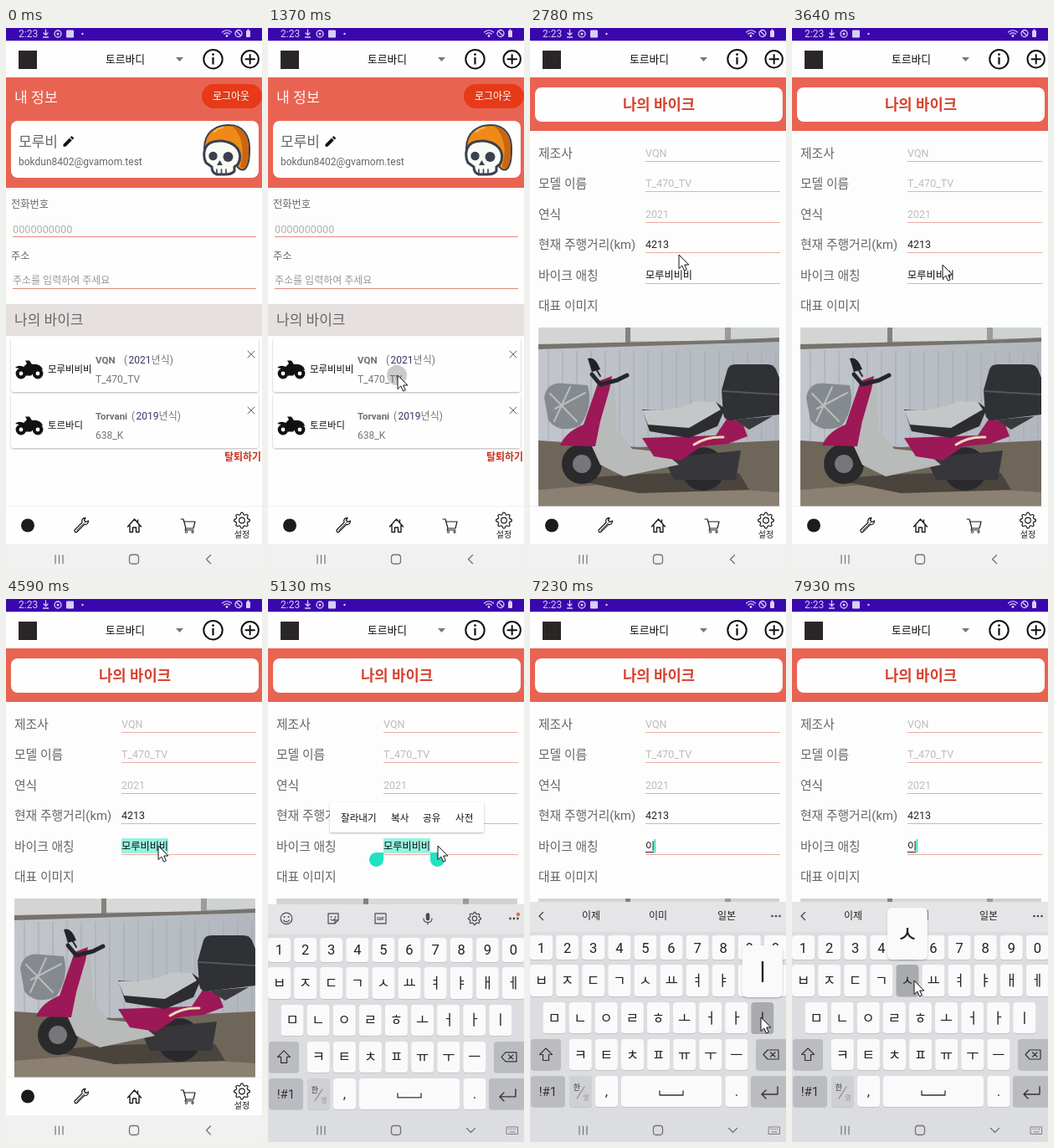
An HTML page that plays this animation: 306x649 px, repeating every 8 s.

```html
<!DOCTYPE html>
<html lang="ko">
<head>
<meta charset="utf-8">
<title>나의 바이크</title>
<style>
html, body { margin: 0; width: 100%; height: 100%; overflow: hidden; background: #fdfdfd; }
svg { display: block; width: 100%; height: 100%; }
text { font-family: Roboto, "Noto Sans CJK KR", "Noto Sans CJK JP", "Noto Sans CJK", sans-serif; white-space: pre; }
</style>
</head>
<body>
<svg id="stage" viewBox="0 0 306 649" lang="ko"></svg>
<script>
const LOOP = 8000;
const RED = '#e96353', TEAL = '#1fe3c0', GREY = '#666';

// Drawing helpers
const rect = (x, y, w, h, fill, r = 0, more = '') =>
  `<rect x="${x}" y="${y}" width="${w}" height="${h}" rx="${r}" fill="${fill}" ${more}/>`;
const disc = (x, y, r, fill, more = '') => `<circle cx="${x}" cy="${y}" r="${r}" fill="${fill}" ${more}/>`;
const ring = (x, y, r, stroke, w = 1) => disc(x, y, r, 'none', `stroke="${stroke}" stroke-width="${w}"`);
const line = (d, stroke, w = 1) =>
  `<path d="${d}" fill="none" stroke="${stroke}" stroke-width="${w}" stroke-linecap="round" stroke-linejoin="round"/>`;
const fillPath = (d, fill, more = '') => `<path d="${d}" fill="${fill}" ${more}/>`;
const text = (x, y, size, str, fill = '#111', more = '') =>
  `<text x="${x}" y="${y}" font-size="${size}" fill="${fill}" ${more}>${str}</text>`;
const mid = (x, y, size, str, fill, more = '') => text(x, y, size, str, fill, `text-anchor="middle" ${more}`);
const group = (id, body) => `<g id="${id}">${body}</g>`;
const at = (x, y, body) => `<g transform="translate(${x} ${y})">${body}</g>`;
const shadowed = body => `<g filter="url(#shadow)">${body}</g>`;
const rule = (x, y, color) => rect(x, y, 299 - x, 1, color);

function gear(x, y, r, stroke, w = 1.2) {
  const pts = [];
  for (let i = 0; i < 32; i++) {
    const a = (i - 1.5) * Math.PI / 16, d = i % 4 === 1 || i % 4 === 2 ? r : r * 0.77;
    pts.push((x + d * Math.sin(a)).toFixed(1) + ' ' + (y - d * Math.cos(a)).toFixed(1));
  }
  return line('M' + pts.join('L') + 'Z', stroke, w) + ring(x, y, r * 0.36, stroke, w);
}

function statusBar() {
  const c = '#d9cff3';
  return rect(0, 0, 306, 15.5, '#3a06ad') + text(15, 11, 12, '2:23', c) +
    line('M47.5 2V8M45 6L47.5 8.5L50 6M44.5 11H50.5', c, 1.3) +
    ring(62, 7, 4, c, 1.3) + disc(62, 7, 1.5, c) + rect(72, 2.5, 9, 9, c, 1) + disc(91.5, 7, 1.2, c) +
    line('M258.5 5Q264 0.5 269.5 5M260.5 7.2Q264 4.5 267.5 7.2', c, 1.2) + disc(264, 9.5, 1.4, c) +
    ring(278, 6.5, 4, c, 1.3) + line('M275.5 4L280.5 9', c, 1.3) +
    rect(287, 3, 5, 8, c, 1) + rect(288.5, 1.5, 2, 2, c);
}

function appBar() {
  return rect(0, 15.5, 306, 44, '#fefefe') + rect(15, 27, 22, 22, '#2b2626') +
    text(119, 42, 12.8, '토르바디') + fillPath('M203 35H212L207.5 40Z', '#777') +
    ring(247.5, 37.2, 11.2, '#111', 2) + rect(246.4, 35, 2.2, 8.5, '#111') + disc(247.5, 31.6, 1.4, '#111') +
    ring(291.7, 37.2, 10.2, '#111', 2) + line('M286.5 37.2H297M291.7 32V42.4', '#111', 2);
}

function tabBar() {
  const k = '#1c1c1c';
  return rect(0, 572, 306, 46, '#fefefe') + rect(0, 571.5, 306, 0.8, '#ececec') + disc(26, 594.5, 8, k) +
    line('M82 600L91 591Q89.5 586 95 585.5L93.5 588.5L95.5 590.5L98.5 589Q98.5 594 93.5 593.5L84.5 602.5Q82 603.5 82 600Z', k, 1.3) +
    line('M84.5 600.5L94 591', k, 0.8) +
    line('M145.5 596L153.5 587L161.5 596M148 594.5V602.5H151.5V597H155.5V602.5H159V594.5M157.5 588V591', k, 1.4) +
    line('M209 587H212L215 598H224L226 590H213M215 598L214 600H224', k, 1.2) +
    ring(215.5, 602.3, 1.2, k) + ring(223, 602.3, 1.2, k) +
    gear(282, 588.5, 9.3, k) + mid(282, 609, 10, '설정', k);
}

function systemBar(bg, typing) {
  const c = '#747474', boxes = [0, 1, 2, 3].map(i => disc(288 + i * 2.5, 633.5, 0.7, c)).join('');
  return rect(0, 617, 306, 32, bg) + line('M59 630V640M63.5 630V640M68 630V640', c, 1.2) +
    `<rect x="147.5" y="629.5" width="11" height="11" rx="3.2" fill="none" stroke="${c}" stroke-width="1.3"/>` +
    (typing
      ? line('M237.5 632.5L242.5 637.5L247.5 632.5', c, 1.3) + boxes +
        line('M285.5 631H298.5V639.5H285.5ZM289 637H295', c, 0.9)
      : line('M244.5 630L239.5 635L244.5 640', c, 1.3));
}

function skull() {
  const ink = '#3a4050', outline = w => `stroke="${ink}" stroke-width="${w}"`;
  return at(234, 115,
    fillPath('M3 29C3 9 17 1 32 1C50 1 58 14 57 32C57 44 55 51 51 54Q46 56 42 50Z', '#f08a16', outline(2)) +
    fillPath('M36 2C50 4 57 16 56 32C56 43 54 50 51 53L46 51C51 34 50 14 36 2Z', '#ca6510') +
    fillPath('M4 29Q8 19 24 20Q41 22 45 34Q47 42 43 48L39 51V56Q36 60 28 60H18Q12 58 12 51L5 46Q1 38 4 29Z', '#fafaf5', outline(3)) +
    disc(13.5, 38, 5.2, ink) + disc(31.5, 39, 6, ink) + fillPath('M21.5 43L18 49H25Z', ink) +
    line('M18 54V59M23.5 54V59M29 54V59', ink, 1.6) + line('M15 9Q19 5 25 4', '#fbb95c', 2));
}

const motorbike = () =>
  [7, 27].map(x => ring(x, 16, 4.4, '#111', 4)).join('') +
  fillPath('M0 9Q4 5 10 8L14 4L12 0.5H17L20 5Q28 4 32 9L33 12L27 10L22 15L19 18.5H13L11 12L5 10Z', '#111');

function bikeCard(y, name, brand, yearX, year, model) {
  return shadowed(rect(6, y, 296, 65, '#fefefe', 4)) + at(11, y + 27, motorbike()) +
    text(50, y + 42, 11.4, name) + text(107, y + 30.5, 11.5, brand, '#707070', 'font-weight="700"') +
    text(yearX, y + 30.5, 12, `(<tspan fill="#3b3468" dx="1.5">${year}</tspan>년식)`, '#777') +
    text(107, y + 54, 12, model, '#777') +
    line(`M289 ${y + 16}l8 8m0 -8l-8 8`, '#666');
}

function profilePage() {
  return rect(0, 59, 306, 132, RED) + text(10, 89, 17.2, '내 정보', '#fff6f4') +
    rect(234, 67, 72, 29, '#e63a18', 14.5) + mid(269, 86, 12, '로그아웃', '#fff') +
    rect(6, 111, 296, 68, '#fefefe', 8) + text(15, 142, 17, '모루비', GREY) +
    fillPath('M68.5 139L76 131.5L78.8 134.3L71.3 141.8H68.5ZM76.8 130.7L78.5 129L81.3 131.8L79.6 133.5Z', '#111') +
    text(15, 164, 12, 'bokdun8402@gvamom.test', GREY) + skull() +
    text(6, 215, 12.2, '전화번호', GREY) + text(8, 245, 12.7, '0000000000', '#b0b0b0') + rule(8, 249, '#e6877a') +
    text(6, 277, 12.2, '주소', GREY) + text(8, 306, 12, '주소를 입력하여 주세요', '#999') + rule(8, 311, '#e6877a') +
    rect(0, 330, 306, 38, '#e6e1e0') + text(10, 355, 17, '나의 바이크', GREY) +
    bikeCard(370, '모루비비비', 'VQN', 141, 2021, 'T_470_TV') +
    bikeCard(437, '토르바디', 'Torvani', 150, 2019, '638_K') +
    text(261, 517, 12, '탈퇴하기', '#c9301f', 'font-weight="700"');
}

// Scooter photo reduced to flat shapes
function photo() {
  const pink = '#9c1857', black = '#2a2a2d';
  let ribs = '';
  for (let x = 22; x < 298; x += 17) ribs += line(`M${x} 386V500`, '#a3a9b0', 1);
  return `<g clip-path="url(#frame)">` + rect(10, 358, 288, 215, 'url(#wall)') + ribs +
    rect(10, 358, 104, 20, '#d3d5d3') + rect(120, 358, 113, 16, '#d8dad8') + rect(240, 358, 58, 13, '#cfd2d2') +
    rect(114, 358, 6, 20, '#85827c') + rect(233, 358, 7, 16, '#9b9c99') +
    fillPath('M10 378L233 373L298 370V375L10 384Z', '#77736c') +
    fillPath('M10 493L130 501L298 493V573H10Z', '#6f665a') + fillPath('M10 552L120 543L298 555V573H10Z', '#8b8072') +
    fillPath('M52 540Q120 530 250 532L262 552L130 556Z', '#4a443d') +
    disc(62, 521, 24, black) + disc(62, 521, 11, '#77777a') +
    disc(207, 527, 26, black) + disc(207, 527, 11, '#5c5c60') + fillPath('M160 514L252 505L246 540H172Z', '#37363a') +
    fillPath('M86 432L101 425L104 480L122 503L160 507L178 522L112 536L84 522L74 500Z', '#b9bbbb') +
    fillPath('M82 422L98 416L95 432L84 470L78 500L36 499Q42 483 64 474Z', pink) +
    fillPath('M134 490L222 487L236 466L254 472L260 488L236 497L205 500L180 517L148 512Z', pink) +
    fillPath('M134 456Q176 460 198 447H222L233 455L224 476L190 490L143 482Z', '#2d2d31') +
    fillPath('M134 457Q176 458 198 446L222 447L228 456L190 478L141 474Z', '#c3c7c8') +
    fillPath('M229 433L236 408Q238 402 246 402H284Q291 402 294 408L298 418V462L240 469Q232 469 231 461Z', '#303135') +
    line('M230 434L298 438', '#55565b', 2) + fillPath('M244 468L290 464L262 480Z', '#3a3a3e') +
    line('M74 414L84 426L104 421L116 415', '#26262a', 5) + line('M84 416L78 406', '#26262a', 2) +
    fillPath('M69 395Q78 392 84 408L74 411Z', '#222328') +
    fillPath('M17 442Q20 422 42 425L69 427Q76 452 60 475Q36 486 22 469Z', '#858a8e') +
    line('M24 437L56 470M48 429L29 470M66 436L30 455', '#b9bdc0', 2) +
    line('M196 498Q211 488 231 489', '#e7d9b4', 3) + `</g>`;
}

function bikePage() {
  const rows = [['제조사', 'VQN'], ['모델 이름', 'T_470_TV'], ['연식', '2021'],
    ['현재 주행거리(km)', '4213'], ['바이크 애칭', ''], ['대표 이미지']];
  return rect(0, 59, 306, 64, RED) + rect(6, 71, 296, 41, '#fefefe', 8) +
    mid(154, 98, 17.8, '나의 바이크', '#d6432f', 'font-weight="700"') +
    rows.map(([label, value], i) => {
      const y = 155 + i * 36.4;
      return text(10, y, 14.8, label, GREY) + (value === undefined ? '' :
        text(138, y - 1, 12.5, value, i < 3 ? '#bcbcbc' : '#222') + rule(138, Math.round(y + 4), '#ecaca2'));
    }).join('') +
    group('highlight', rect(138, 286, 56, 18, '#97f2e0')) +
    text(138, 299.5, 12.2, '', '#111', 'id="nick"') +
    group('caret', rect(138, 302, 10, 1, '#222') + rect(148.5, 287, 1.6, 16, TEAL)) +
    group('photo', photo());
}

function selectionTools() {
  const items = [[87, '잘라내기'], [147, '복사'], [185, '공유'], [224, '사전']];
  return shadowed(rect(74, 243, 184, 36, '#fefefe', 2)) + items.map(([x, s]) => text(x, 265.5, 11.6, s)).join('') +
    fillPath('M138 303V311.5A8.5 8.5 0 1 1 129.5 303Z', TEAL) +
    fillPath('M194 303V311.5A8.5 8.5 0 1 0 202.5 303Z', TEAL);
}

// Keyboard
const PITCH = 31.1;
const keys = {};
const key = (x, y, w, h, fill) => rect(x, y + 1, w, h, '#c3c4c8', 4) + rect(x, y, w, h, fill, 4);

function keyRow(chars, firstX, y, h) {
  return [...chars].map((c, i) => {
    const x = firstX + i * PITCH;
    keys[c] = { x, y };
    return key(x - 13.5, y, 27, h, '#fafafa') + mid(x, y + h / 2 + 6, 16.5, c, '#222');
  }).join('');
}

const dots = () => [289.5, 294, 298.5].map(x => disc(x, 379, 1.3, '#444')).join('');

function toolbar() {
  const c = '#4a4a4d';
  return ring(22, 379, 6.8, c, 1.2) + disc(19.5, 377, 1, c) + disc(24.5, 377, 1, c) + line('M18.5 381Q22 385 25.5 381', c, 1.1) +
    line('M72 373H84V381L80 385H72ZM84 381H80V385M75 380Q78 383 80 379', c, 1.2) + disc(75.5, 377, 0.9, c) + disc(80.5, 377, 0.9, c) +
    line('M128 373H141V385H128Z', c, 1.2) + mid(134.5, 381.5, 6, 'GIF', c, 'font-weight="700"') +
    line('M191 374.5V379', c, 4.5) + line('M186 379Q186 383.5 191 383.5Q196 383.5 196 379M191 383.5V386', c, 1.2) +
    gear(247, 379, 7.5, c) + dots() + disc(299, 374, 2.2, '#f0672c');
}

function keyboard() {
  const dark = '#bbbcc1', k = '#333';
  return rect(0, 362, 306, 287, '#dcdde1') + rect(0, 362, 306, 36, '#e5e5e8') +
    group('tools', toolbar()) +
    group('suggest', line('M15.5 374.5L11 379L15.5 383.5', '#444', 1.3) + dots() +
      [73, 153, 235].map(x => mid(x, 383, 12, '', '#222', 'class="word"')).join('')) +
    keyRow('1234567890', 13.5, 402, 29) + keyRow('ㅂㅈㄷㄱㅅㅛㅕㅑㅐㅔ', 13.5, 437, 38) +
    keyRow('ㅁㄴㅇㄹㅎㅗㅓㅏㅣ', 29, 482, 37) + keyRow('ㅋㅌㅊㅍㅠㅜㅡ', 60.3, 526, 37) +
    key(1, 526, 36, 37, dark) + line('M19 537L26.5 544.5H22.5V551.5H15.5V544.5H11.5Z', k, 1.2) +
    key(270, 526, 38, 37, dark) + line('M279 544.5L284 539H297V550H284ZM287.5 542L293 547M293 542L287.5 547', k, 1.2) +
    key(1, 570, 41, 37, dark) + mid(21.5, 594, 15, '!#1', k) +
    key(47, 570, 27, 37, '#cfd0d4') + mid(56, 587, 9, '한', k) + line('M56 597L65 583', '#777') + mid(67, 599, 8, '영', '#999') +
    key(78, 570, 27, 37, '#fafafa') + mid(91.5, 594, 17, ',', k) +
    key(109, 570, 120, 37, '#fafafa') + line('M155 588V593H183V588', k, 1.3) +
    key(233.5, 570, 27, 37, '#fafafa') + mid(247, 594, 17, '.', k) +
    key(264, 570, 44, 37, dark) + line('M296 583V592H277M282 587L277 592L282 597', k, 1.4) +
    group('pressed', rect(-13.5, 0, 27, 38, '#a9aaae', 4) + mid(0, 25, 16.5, '', '#222', 'class="glyph"') +
      shadowed(rect(-24, -68, 48, 62, '#fafafa', 6)) + mid(0, -26, 28, '', '#222', 'class="glyph"'));
}

const stage = document.getElementById('stage');
stage.innerHTML = `<defs>
  <filter id="shadow" x="-20%" y="-20%" width="140%" height="140%">
    <feDropShadow dx="0" dy="1" stdDeviation="1" flood-opacity="0.28"/></filter>
  <linearGradient id="wall"><stop stop-color="#c2c6cc"/><stop offset="1" stop-color="#b1b7bd"/></linearGradient>
  <clipPath id="frame"><rect x="10" y="358" width="288" height="215"/></clipPath></defs>` +
  rect(0, 0, 306, 649, '#fdfdfd') + statusBar() + appBar() +
  group('profile', profilePage()) + group('bike', bikePage()) +
  tabBar() + systemBar('#f1f1f1', false) +
  group('selection', selectionTools()) +
  group('typing', group('board', keyboard()) + systemBar('#dcdde1', true)) +
  group('tap', disc(154, 415, 12, '#555')) +
  group('cursor', fillPath('M0 0V16.5L3.8 13L6.5 19L9.3 17.8L6.7 12H11.8Z', '#fff', 'stroke="#111" stroke-width="1" stroke-linejoin="round"'));

// Timeline
const el = id => document.getElementById(id);
const show = (id, on) => { el(id).style.display = on ? '' : 'none'; };
const path = [[990, 167, 454], [1070, 155, 419], [1370, 155, 415], [2460, 155, 415], [2780, 178, 271],
  [3240, 178, 271], [4040, 182, 295], [4590, 182, 295], [4900, 203, 295], [5780, 203, 295], [6460, 97, 492],
  [6610, 96, 497], [6850, 96, 497], [7200, 276, 500], [7420, 276, 500], [7850, 146, 456], [LOOP, 146, 456]];
const presses = [[6690, 6860, 'ㅇ'], [7230, 7400, 'ㅣ'], [7850, LOOP, 'ㅅ']];
const typed = [[7230, '이', ['이제', '이미', '일본']], [6690, 'ㅇ', ['아', '오늘', '이거']], [0, '모루비비비', []]];

function cursorAt(t) {
  const i = Math.max(1, path.findIndex(p => p[0] >= t));
  const [t0, x0, y0] = path[i - 1], [t1, x1, y1] = path[i];
  const u = Math.min(1, Math.max(0, (t - t0) / (t1 - t0)));
  return [x0 + (x1 - x0) * u, y0 + (y1 - y0) * u];
}

function render(t) {
  const composing = t >= 6690, keysUp = t >= 4980;
  show('profile', t < 1760);
  show('bike', t >= 1760);
  show('photo', t >= 2220);
  show('highlight', t >= 4300 && !composing);
  show('selection', keysUp && !composing);
  show('caret', composing);
  show('typing', keysUp);
  show('tools', !composing);
  show('suggest', composing);
  show('tap', t >= 1370 && t < 1650);
  el('tap').setAttribute('opacity', 0.3 * Math.min(1, (1650 - t) / 160));

  const [, nick, words] = typed.find(s => t >= s[0]);
  el('nick').textContent = nick;
  stage.querySelectorAll('.word').forEach((w, i) => { w.textContent = words[i] || ''; });

  const rise = Math.min(1, Math.max(0, (t - 4900) / 320));
  el('board').setAttribute('transform', `translate(0 ${(255 * (1 - rise) ** 3.5).toFixed(2)})`);

  const press = presses.find(([from, to]) => t >= from && t < to);
  show('pressed', !!press);
  if (press) {
    const { x, y } = keys[press[2]];
    el('pressed').setAttribute('transform', `translate(${x} ${y})`);
    stage.querySelectorAll('.glyph').forEach(g => { g.textContent = press[2]; });
  }

  show('cursor', t >= 990);
  el('cursor').setAttribute('transform', `translate(${cursorAt(t).join(' ')})`);
}

const start = performance.now();
function tick() {
  render((performance.now() - start) % LOOP);
  requestAnimationFrame(tick);
}
tick();
</script>
</body>
</html>
```
